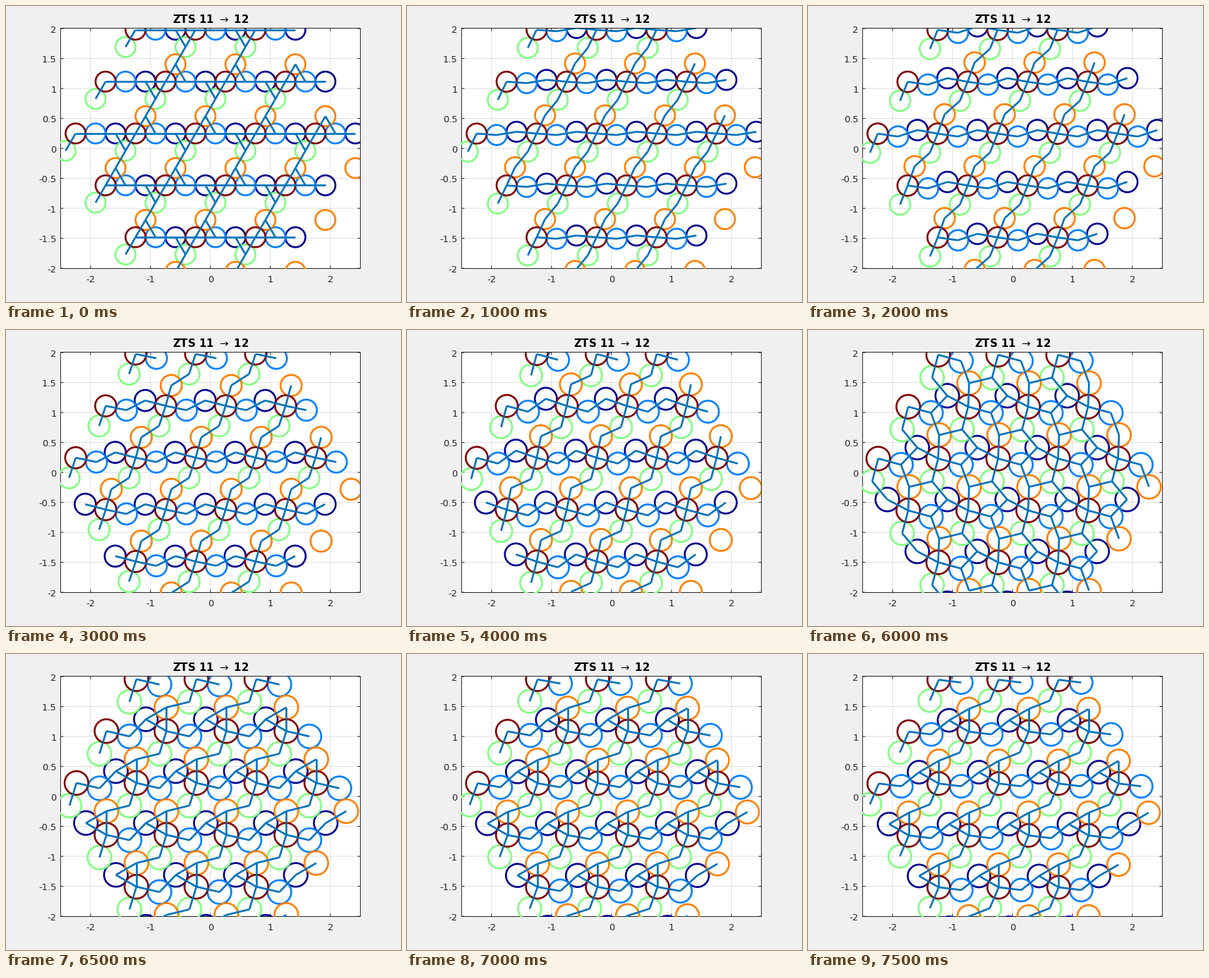
Animation, 560 px wide and 420 px high, one loop 8000 ms. Source, as a matplotlib script:

```python
import numpy as np
import matplotlib.pyplot as plt
from matplotlib.animation import FuncAnimation
from matplotlib.collections import LineCollection
from matplotlib.patches import Rectangle

W, H, DPI = 560, 420, 100
FRAMES, STEP = 16, 500
LEFT, RIGHT, TOP, BOTTOM = 77.4, 502.4, 31.5, 372.5
CX, CY, SCALE = 289.9, 202.1, 85
INK, GRID = (0.15, 0.15, 0.15), "0.875"
PT = 72 / DPI

A1 = np.array([1, 0])
A2 = np.array([0.5, np.sqrt(0.75)])
RED0 = np.array([-0.25, 0.25])
CELLS = np.array([i * A1 + j * A2 for j in range(-2, 3) for i in range(-2, 3)
                  if abs(i + j) <= 2])
COLORS = [(0, 0, 0.56), (0, 0.5, 1), (0.5, 1, 0.5), (1, 0.5, 0), (0.5, 0, 0)]
RING = np.linspace(0, 2 * np.pi, 73)

# Contact changes: time (s) and steeper chain angle (degrees)
T_LOCK, T_FREE = 5.2, 6.45
Q_LOCK, Q_FREE = 23.55, 30
SKEW = 1.25
WRAP = 3.0


def to_px(p):
    return np.array([CX, CY]) + SCALE * np.asarray(p) * [1, -1]


def unit(deg):
    a = np.radians(deg)
    return np.array([np.cos(a), np.sin(a)])


def bisect(f, lo, hi):
    """Root of an increasing function."""
    for _ in range(50):
        mid = (lo + hi) / 2
        lo, hi = (mid, hi) if f(mid) < 0 else (lo, mid)
    return (lo + hi) / 2


def diameter(p, q):
    """Disc diameter for which a three-link chain spans one lattice vector."""
    (cp, sp), (cq, sq) = unit(p), unit(q)
    return 1 / (cp + cq + np.sqrt(1 - (sp + sq) ** 2))


def rise(p, q):
    return diameter(p, q) * unit(p)[1]


def overlap(p, q):
    """Positive where neighbouring chains would penetrate."""
    d = diameter(p, q)
    return d - np.hypot(*(d * (unit(-p) - unit(60 + q)) - A1 + A2))


def angles(t):
    if t < T_LOCK:
        p = bisect(lambda a: rise(a, SKEW * a) - 0.024 * t, 0, 22)
        return p, SKEW * p
    if t < T_FREE:
        q = Q_LOCK + (Q_FREE - Q_LOCK) * (t - T_LOCK) / (T_FREE - T_LOCK)
        return bisect(lambda a: overlap(a, q), 5, 25), q
    h = 0.0905 - 0.0423 * (t - T_FREE)
    return bisect(lambda a: rise(a, Q_FREE) - h, 0, 25), Q_FREE


def packing(t):
    """Disc centres, grouped by colour, and their diameter."""
    p, q = angles(t)
    d = diameter(p, q)
    basis = np.array([A1 - d * unit(-q), d * unit(-p), -d * unit(60 + p),
                      d * unit(60 + q) + A1 - A2, [0, 0]])
    # keep the centre of mass at rest
    basis += RED0 - (basis.sum(axis=0) - 2 * A1 + A2) / 5
    if t >= WRAP:
        basis[0] -= A2
    return (basis[:, None] + CELLS).reshape(-1, 2), d


fig = plt.figure(figsize=(W / DPI, H / DPI), dpi=DPI, facecolor="0.94")
ax = fig.add_axes([0, 0, 1, 1])
ax.set_xlim(0, W)
ax.set_ylim(H, 0)
ax.axis("off")


def rule(x, y, color=INK):
    ax.plot(x, y, color=color, lw=PT, solid_capstyle="butt", snap=False, zorder=1)


def label(x, y, s, ha="center", size=13, **kw):
    ax.text(x, y, s, ha=ha, va="baseline", family="DejaVu Sans",
            fontsize=size * PT, **kw)


def box(z, **kw):
    return ax.add_patch(Rectangle((LEFT, TOP), RIGHT - LEFT, BOTTOM - TOP,
                                  lw=PT, snap=False, zorder=z, **kw))


frame = box(0, fc="white", ec="none")
for v in range(-2, 3):
    x = to_px([v, 0])[0]
    rule([x, x], [TOP, BOTTOM], GRID)
    rule([x, x], [TOP, TOP + 4])
    rule([x, x], [BOTTOM, BOTTOM - 4])
    label(x, 392, str(v), color=INK)
for v in np.arange(-2, 2.5, 0.5):
    y = to_px([0, v])[1]
    if abs(v) < 2:
        rule([LEFT, RIGHT], [y, y], GRID)
    rule([LEFT, LEFT + 4], [y, y])
    rule([RIGHT, RIGHT - 4], [y, y])
    label(71.5, y + 5.5, f"{v:g}", ha="right", color=INK)
box(1.5, fc="none", ec=INK)

plt.rcParams["mathtext.fontset"] = "dejavusans"
label(290, 24, r"ZTS 11 ${\rightarrow}$ 12", size=15, weight="bold", color="black")

discs = LineCollection([], colors=np.repeat(COLORS, len(CELLS), axis=0),
                       linewidths=2.67 * PT, zorder=2)
bonds = LineCollection([], colors=[(0, 0.447, 0.741)], linewidths=2.67 * PT,
                       capstyle="butt", zorder=3)
for c in (discs, bonds):
    ax.add_collection(c, autolim=False)
    c.set_clip_path(frame)


def draw(i):
    pts, d = packing(i * STEP / 1000)
    ring = d / 2 * np.column_stack([np.cos(RING), np.sin(RING)])
    discs.set_segments(list(to_px(pts[:, None] + ring)))
    gap = np.hypot(*(pts[:, None] - pts).transpose(2, 0, 1))
    a, b = np.nonzero(np.triu(gap < 1.006 * d, 1))
    bonds.set_segments(list(to_px(np.stack([pts[a], pts[b]], axis=1))))
    return discs, bonds


anim = FuncAnimation(fig, draw, frames=FRAMES, interval=STEP, repeat=True,
                     repeat_delay=0, blit=False)
plt.show()
```
